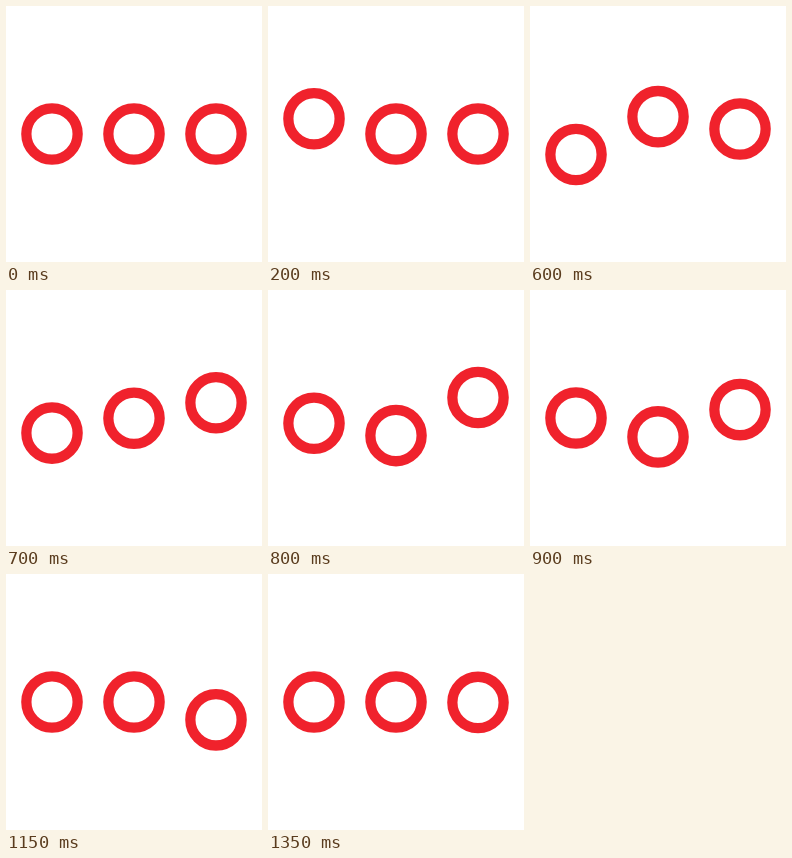
Recreate the animation shown at these times as an HTML page. Size 256 px wide and 256 px high, loop 1.4 s.

```html
<!DOCTYPE html>
<html lang="en">
<head>
<meta charset="utf-8">
<title>Bouncing rings</title>
<style>
html, body { margin: 0; width: 100%; height: 100%; overflow: hidden; background: #fff; }
svg { display: block; width: 100vw; height: 100vh; }
circle { fill: none; stroke: #f0222c; stroke-width: 10.3; }
</style>
</head>
<body>
<svg viewBox="0 0 256 256">
  <circle cx="46" cy="128" r="25.65"/>
  <circle cx="128" cy="128" r="25.65"/>
  <circle cx="210" cy="128" r="25.65"/>
</svg>
<script>
const LOOP = 1400, REST = 128;
const STOPS = [0, -20.5, 20.5, 0];
const TIMING = [
  { start: 0, step: 300 },
  { start: 250, step: 300 },
  { start: 508, step: 289 }
];
const rings = document.querySelectorAll('circle');
const ease = u => u * u * (3 - 2 * u);

// Rest, up, down, rest: three eased moves of equal length.
function offset(t, { start, step }) {
  const p = (t - start) / step;
  if (p <= 0 || p >= 3) return 0;
  const i = Math.floor(p);
  return STOPS[i] + (STOPS[i + 1] - STOPS[i]) * ease(p - i);
}

function draw(t) {
  rings.forEach((ring, i) => ring.setAttribute('cy', REST + offset(t, TIMING[i])));
}

function tick() {
  draw(performance.now() % LOOP);
  requestAnimationFrame(tick);
}
tick();
</script>
</body>
</html>
```
